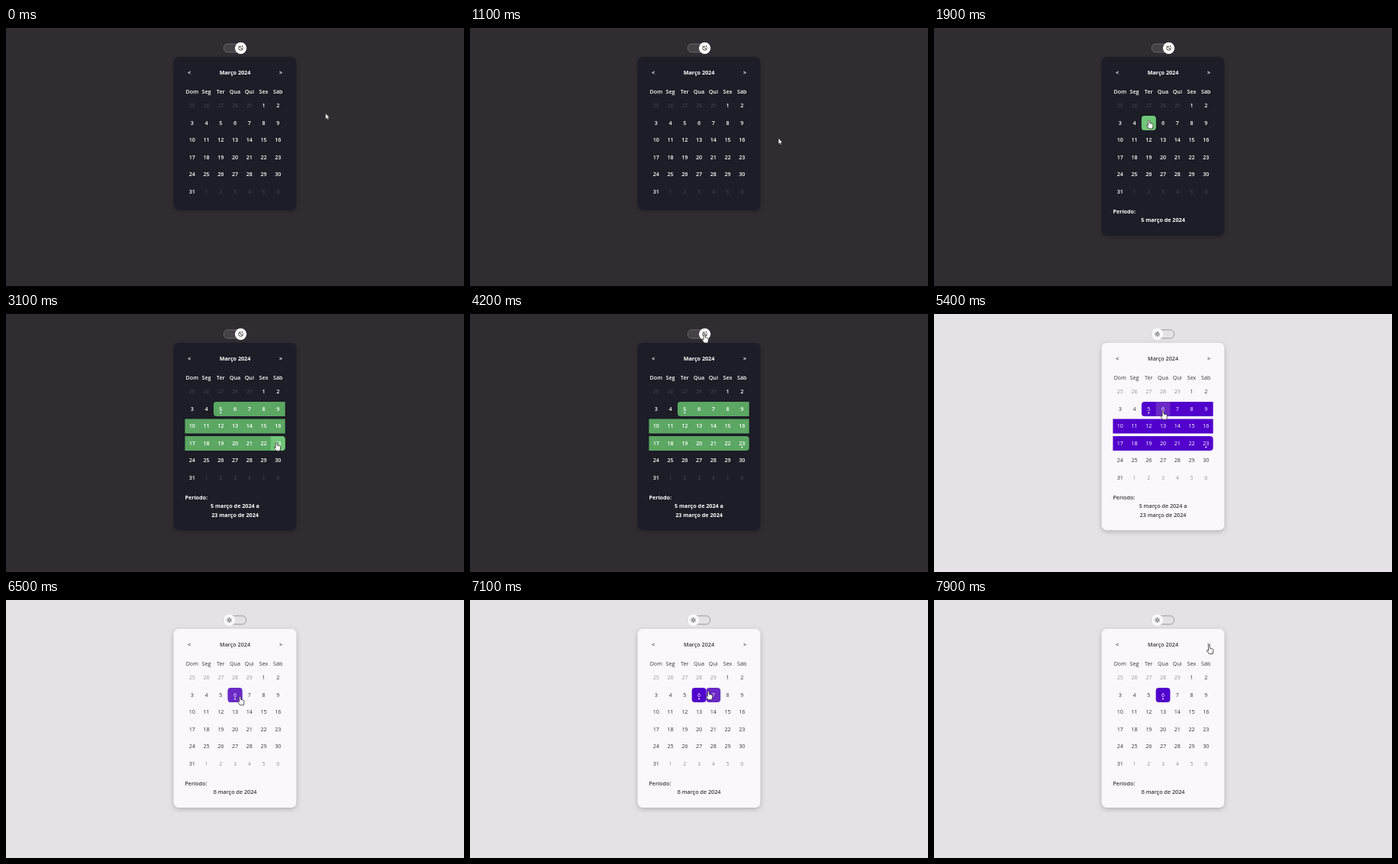
An HTML page that plays this animation: 600x338 px, repeating every 8000 ms.

```html
<!DOCTYPE html>
<html lang="pt">
<head>
<meta charset="utf-8">
<title>Calendário</title>
<style>
html, body { margin: 0; width: 100%; height: 100%; overflow: hidden; }
svg { display: block; width: 100vw; height: 100vh; font-family: "Open Sans", "Noto Sans", sans-serif; font-size: 7.2px; text-anchor: middle; }
.card { filter: drop-shadow(0 2px 3px rgba(0, 0, 0, .22)); }
</style>
</head>
<body>
<svg id="stage" viewBox="0 0 600 338" xmlns="http://www.w3.org/2000/svg"></svg>
<script>
const LOOP = 8000, STEP = 100;
const COL = 18.75, ROW = 22.5, LEFT = 234.4, TOP = 92, CELL = 19;
const FIRST = 5, LAST = 31, PREVIOUS = 29; // weekday of day 1, days in this and the previous month
const CLICK = { start: 1900, end: 3100, theme: 4300, restart: 5600 };
const DARK = { bg: '#302d32', card: '#1c1d26', text: '#fff', dim: '#3d3d45', sel: '#5ba763',
  hover: '#70c678', knob: '#fff', pill: '#454247', edge: '#747177', weight: 600, bold: 700 };
const LIGHT = { bg: '#e4e2e5', card: '#faf8fc', text: '#39373d', dim: '#99979d', sel: '#5200cc',
  hover: '#6a29c5', knob: '#fbfafc', pill: 'none', edge: '#858388', weight: 400, bold: 600 };

const place = day => [Math.floor((day + FIRST - 1) / 7), (day + FIRST - 1) % 7];
const smooth = k => k * k * (3 - 2 * k);
const progress = (t, from, to) => smooth(Math.min(1, Math.max(0, (t - from) / (to - from))));

function centre(day, dx = 0, dy = 0) {
  const [r, c] = place(day);
  return { x: LEFT + (c + .5) * COL + dx, y: TOP + r * ROW + CELL / 2 + dy };
}

// The pointer rests at each stop until the next glide begins
const STOPS = [
  { at: { x: 418.7, y: 112 } },
  { leave: 500, arrive: 600, at: { x: 447, y: 153 } },
  { leave: 900, arrive: 1500, at: centre(5, .4, -3.4) },
  { leave: 1900, arrive: 2300, at: centre(23, -2, -1) },
  { leave: 3100, arrive: 3300, at: centre(14, 7, 6) },
  { leave: 3700, arrive: 4100, at: { x: 307, y: 26.6 } },
  { leave: 4300, arrive: 4700, at: centre(6, 0, 11) },
  { leave: 4900, arrive: 5400, at: centre(6, 0, 3) },
  { leave: 6000, arrive: 6500, at: centre(6, 6.6, 2.4) },
  { leave: 6900, arrive: 7900, at: { x: 360.5, y: 59.3 } }
];

function pointer(t) {
  return STOPS.reduce((p, { leave, arrive, at }) => {
    const k = leave === undefined ? 1 : progress(t, leave, arrive);
    return { x: p.x + (at.x - p.x) * k, y: p.y + (at.y - p.y) * k };
  }, STOPS[0].at);
}

function selection(t) {
  if (t >= CLICK.restart) return [6, 6];
  if (t >= CLICK.end) return [5, 23];
  return t >= CLICK.start ? [5, 5] : [0, 0];
}

function hoveredDay({ x, y }) {
  const c = Math.floor((x - LEFT) / COL), r = Math.floor((y - TOP) / ROW);
  const inside = c >= 0 && c < 7 && y - TOP - r * ROW <= CELL;
  const day = r * 7 + c - FIRST + 1;
  return inside && day > 0 && day <= LAST ? day : 0;
}

const label = (x, y, s, fill, attrs = '') => `<text x="${x}" y="${y}" fill="${fill}" ${attrs}>${s}</text>`;

// Bar over columns c0..c1 with its left and right corner radii
function bar(row, c0, c1, l, r, fill) {
  const x = LEFT + c0 * COL, w = (c1 - c0 + 1) * COL, y = TOP + row * ROW + .4;
  return `<path fill="${fill}" d="M${x + l} ${y}H${x + w - r}q${r} 0 ${r} ${r}v${CELL - 2 * r}q0 ${r} ${-r} ${r}` +
    `H${x + l}q${-l} 0 ${-l} ${-l}v${2 * l - CELL}q0 ${-l} ${l} ${-l}Z"/>`;
}

function days(th, [from, to], hover) {
  let bars = '', nums = '';
  const radius = (d, edge) => d === edge || d < from || d > to ? 4 : 0;
  const span = (a, b, fill) => {
    const [r, c0] = place(a), c1 = place(b)[1];
    bars += bar(r, c0, c1, radius(a, from), radius(b, to), fill);
  };
  for (let d = from; from && d <= to;) {
    const end = Math.min(to, d + 6 - place(d)[1]);
    span(d, end, th.sel);
    d = end + 1;
  }
  if (hover) span(hover, hover, th.hover);

  for (let i = 0; i < 42; i++) {
    const d = i - FIRST + 1, { x, y } = centre(d);
    const out = d < 1 || d > LAST, picked = from && d >= from && d <= to;
    const fill = out ? th.dim : picked || d === hover ? '#fff' : th.text;
    nums += label(x, y + 2.6, d < 1 ? d + PREVIOUS : out ? d - LAST : d, fill);
    if (picked && (d === from || d === to)) nums += `<circle cx="${x}" cy="${y + 5.5}" r=".95" fill="#fff"/>`;
  }
  return bars + nums;
}

function toggle(th, t) {
  const x = 307.5 - 15 * progress(t, CLICK.theme, CLICK.theme + 300);
  let icon = '';
  if (th === DARK) {
    icon = '<path d="M-.5-2.8A2.9 2.9 0 1 0 2.9.6 2.5 2.5 0 0 1-.5-2.8Z"/><path d="M1.2-2.6h1.4M1.9-3.3v1.4M2.6-.8h.8"/>';
  } else {
    icon = '<circle r="1.5"/>';
    for (let a = 0; a < 360; a += 45) icon += `<path d="M0-2.4V-3.5" transform="rotate(${a})"/>`;
  }
  return `<rect x="285.2" y="20.8" width="29.6" height="11" rx="5.5" fill="${th.pill}" stroke="${th.edge}" stroke-width=".8"/>
    <circle cx="${x}" cy="26.3" r="7.6" fill="${th.knob}"/>
    <g transform="translate(${x} 26.3)" fill="none" stroke="#222" stroke-width=".85">${icon}</g>`;
}

function cursor({ x, y }, hover) {
  const over = (cx, cy, w) => Math.abs(x - cx) < w && Math.abs(y - cy) < 8;
  const hand = 'M-1 1a1 1 0 0 1 2 0V4L4.3 4.8Q5.5 5.2 5.4 6.6L4.7 11.3H-.2L-2.9 7.5Q-3.4 6.3-2.3 6.2L-1 7.2Z';
  const arrow = 'M0 0V7.3L1.7 5.8 2.8 8.3 3.9 7.8 2.8 5.4H5Z';
  const isHand = hover || over(300, 26.3, 15) || over(360, 59, 10);
  return `<path transform="translate(${x} ${y})" d="${isHand ? hand : arrow}" fill="#fff" stroke="#222" stroke-width="${isHand ? .75 : .4}"/>`;
}

function draw(t) {
  const th = t < CLICK.theme ? DARK : LIGHT;
  const [from, to] = selection(t), p = pointer(t), hover = hoveredDay(p);
  const lines = !from ? [] : from === to ? [from] : [from, to];
  const height = 200.7 + (lines.length && 22.2 + 11.3 * lines.length);
  const bold = (x, y, s, attrs = '') => label(x, y, s, th.text, `font-weight="${th.bold}" ${attrs}`);

  let out = `<rect width="600" height="338" fill="${th.bg}"/>${toggle(th, t)}
    <rect class="card" x="219.6" y="37.8" width="160.8" height="${height}" rx="7" fill="${th.card}"/>`;
  out += bold(240, 61.1, '&lt;') + bold(300, 61.1, 'Março 2024') + bold(360, 61.1, '&gt;');

  out += `<g font-weight="${th.weight}">`;
  ['Dom', 'Seg', 'Ter', 'Qua', 'Qui', 'Sex', 'Sáb'].forEach((s, i) => {
    out += label(LEFT + (i + .5) * COL, 85.5, s, th.text);
  });
  out += days(th, [from, to], hover) + '</g>';

  if (lines.length) out += bold(234.4, 243.1, 'Período:', 'text-anchor="start"');
  lines.forEach((day, i) => {
    const joint = i < lines.length - 1 ? ' a' : '';
    out += bold(300, 254.4 + 11.3 * i, `${day} março de 2024${joint}`);
  });
  stage.innerHTML = out + cursor(p, hover);
}

const stage = document.getElementById('stage');
const start = performance.now();
let shown = -1;
function tick() {
  const t = Math.floor((performance.now() - start) % LOOP / STEP) * STEP;
  if (t !== shown) draw(shown = t);
  requestAnimationFrame(tick);
}
tick();
</script>
</body>
</html>
```
